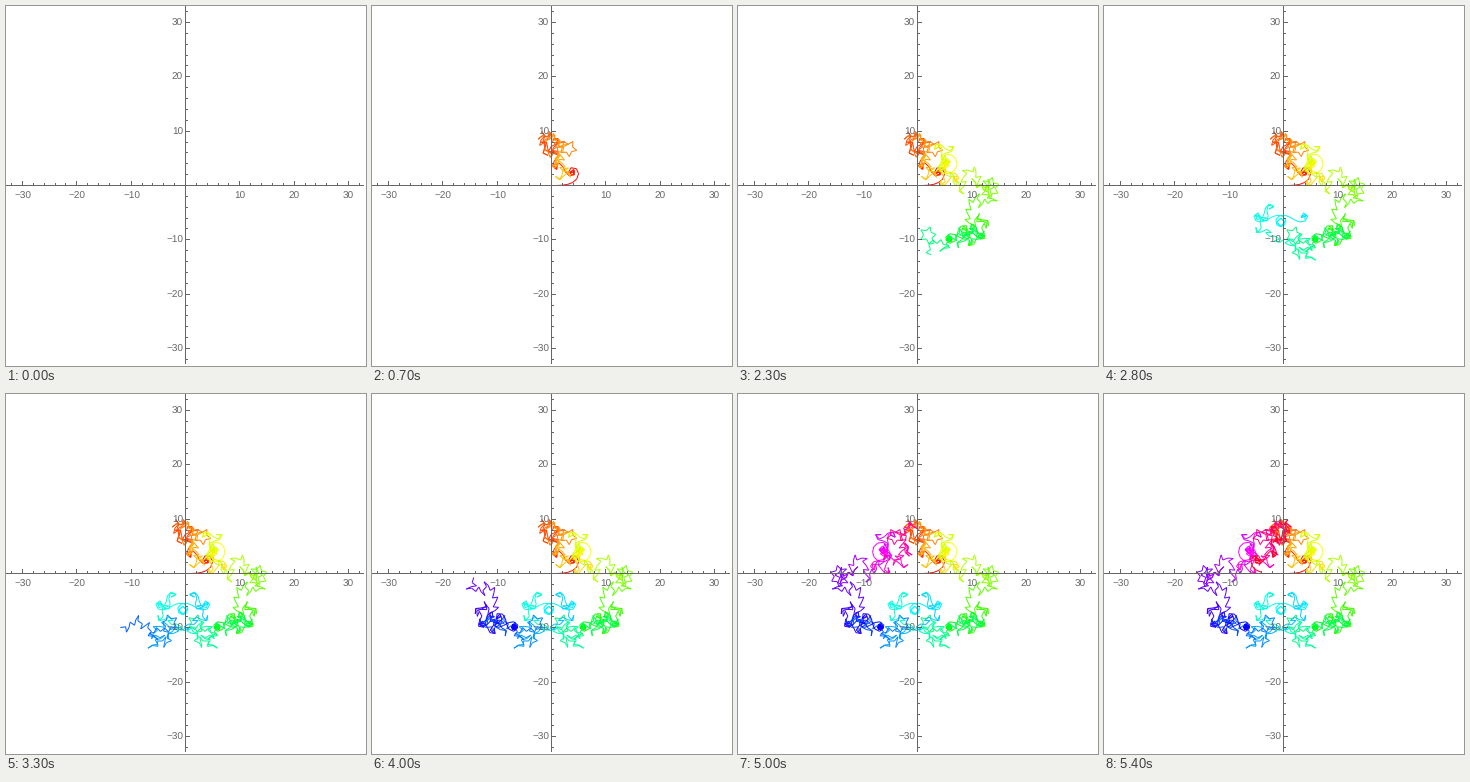
Write a matplotlib script that moves like this. It is 360 by 360 pixels and loops after 5.5 s.

```python
import numpy as np
import matplotlib.pyplot as plt
from matplotlib.animation import FuncAnimation
from matplotlib.collections import LineCollection
from matplotlib.colors import hsv_to_rgb

SIZE, DPI = 360, 100
PX = 72 / DPI                    # one pixel in points
TERMS, STEP, FRAMES = 1085, 20, 55
ORIGIN = 179.5
HALF = 179                       # half the plot width in pixels
SCALE = HALF / np.sqrt(TERMS)
GREY = "0.4"

plt.rcParams["font.family"] = "Liberation Sans"
plt.rcParams["text.hinting"] = "none"

# Partial sums of exp(2 pi i n^3 / TERMS)
n = np.arange(1, TERMS + 1, dtype=np.int64)
walk = np.cumsum(np.exp(2j * np.pi * (n**3 % TERMS) / TERMS))
points = np.column_stack([ORIGIN + SCALE * walk.real,
                          ORIGIN - SCALE * walk.imag])
segments = np.stack([points[:-1], points[1:]], axis=1)
hues = n[1:] / TERMS
colors = hsv_to_rgb(np.column_stack([hues, np.ones_like(hues),
                                     np.ones_like(hues)]))

fig = plt.figure(figsize=(SIZE / DPI, SIZE / DPI), dpi=DPI, facecolor="white")
ax = fig.add_axes([0, 0, 1, 1])
ax.set_xlim(0, SIZE)
ax.set_ylim(SIZE, 0)
ax.axis("off")

curve = LineCollection([], linewidths=PX, capstyle="butt", zorder=1)
ax.add_collection(curve, autolim=False)


def stroke(x0, y0, x1, y1):
    ax.plot([x0, x1], [y0, y1], color=GREY, lw=PX, zorder=2,
            solid_capstyle="butt", snap=False)


def pixel_centre(v):
    return np.floor(v) + 0.5


def draw_axes():
    low, high = 0, 2 * HALF
    stroke(low, ORIGIN, high, ORIGIN)
    stroke(ORIGIN, low, ORIGIN, high)
    style = dict(color=GREY, fontsize=10 * PX, va="baseline", zorder=3)
    for v in range(-32, 33, 2):
        if v == 0:
            continue
        major = v % 10 == 0
        length = 4.5 if major else 2.5
        x = pixel_centre(ORIGIN + v * SCALE)
        y = pixel_centre(ORIGIN - v * SCALE)
        stroke(x, ORIGIN, x, ORIGIN - length)
        stroke(ORIGIN, y, ORIGIN + length, y)
        if major:
            label = str(v).replace("-", "\u2212")
            ax.text(x, 192.5, label, ha="center", **style)
            ax.text(177, y + 3.5, label, ha="right", **style)


def update(frame):
    count = frame * STEP
    curve.set_segments(segments[:count])
    curve.set_color(colors[:count])
    return (curve,)


draw_axes()
anim = FuncAnimation(fig, update, frames=FRAMES, interval=100,
                     repeat=True, repeat_delay=0, blit=False)
plt.show()
```
